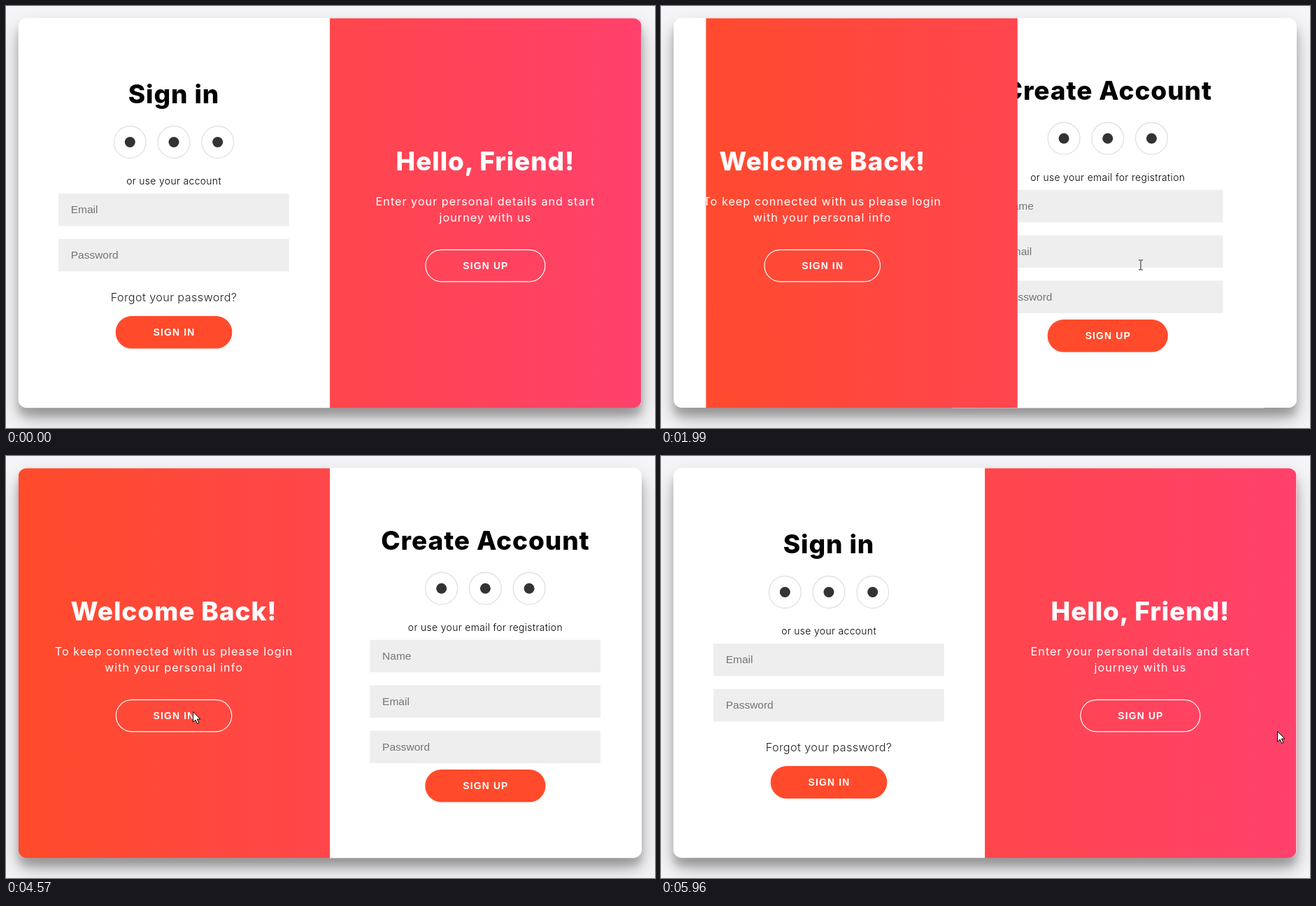
Animation of 928 by 603 pixels, one loop 6040 ms. Source, as an HTML page:

```html
<!DOCTYPE html>
<html lang="en">
<head>
<meta charset="utf-8">
<title>Sliding sign in form</title>
<style>
  html, body { margin: 0; width: 100%; height: 100%; overflow: hidden; background: #f6f5f7; }
  #shadow {
    position: absolute; left: 17.7px; top: 17.4px; width: 890.9px; height: 556.8px;
    border-radius: 11.6px; background: #fff;
    box-shadow: 0 16px 32px rgba(0, 0, 0, .25), 0 12px 12px rgba(0, 0, 0, .22);
  }
  svg { position: absolute; left: 0; top: 0; }
  text { font: 16.2px Inter, sans-serif; text-anchor: middle; }
  .title { font-size: 37px; font-weight: 800; letter-spacing: .9px; }
  .lead { letter-spacing: 1px; }
  .small { font-size: 13.9px; font-weight: 300; letter-spacing: .35px; }
  .link { font-weight: 300; letter-spacing: .4px; fill: #222; }
  .hint { font: 15.5px "Liberation Sans", Arial, sans-serif; text-anchor: start; fill: #757575; }
  .label { font: bold 13.9px "Liberation Sans", Arial, sans-serif; letter-spacing: 1.16px; fill: #fff; }
  .light { fill: #fff; }
</style>
</head>
<body>
<div id="shadow"></div>
<svg width="928" height="603" viewBox="0 0 928 603">
  <defs>
    <clipPath id="cardClip"><rect x="17.7" y="17.4" width="890.9" height="556.8" rx="11.6"/></clipPath>
    <clipPath id="paneClip"><rect id="pane" y="17" width="445.4" height="558"/></clipPath>
    <linearGradient id="red" gradientUnits="userSpaceOnUse" x1="18" x2="909">
      <stop stop-color="#ff4b2b"/><stop offset="1" stop-color="#ff416c"/>
    </linearGradient>
  </defs>
  <g clip-path="url(#cardClip)">
    <g id="signIn"></g>
    <g id="signUp"></g>
    <g clip-path="url(#paneClip)">
      <rect x="17" y="17" width="893" height="558" fill="url(#red)"/>
      <g id="welcome"></g>
      <g id="hello"></g>
    </g>
  </g>
  <g id="cursor">
    <circle id="ring" r="13" fill="none" stroke="#333" stroke-width="1.2"/>
    <path id="arrow" d="M.5 .5V15.2L4 12l2.6 5.6 2.3-1.1L6.4 11H11Z" fill="#fff" stroke="#000"/>
    <path id="beam" d="M-1-6H1.5L2-5.5 2.5-6H5M2-5.5V7.5M-1 8H1.5L2 7.5 2.5 8H5" fill="none" stroke="#222"/>
  </g>
</svg>
<script>
const $ = id => document.getElementById(id);
const LOOP = 6040, HALF = 445.4, LEFT = 17.7, MID = 240, STEP = 77;

// Markup helpers; forms are laid out in the left half of the card.
const text = (cls, y, words, x = MID) => `<text class="${cls}" x="${x}" y="${y}">${words}</text>`;

const button = (y, width, words, x = MID, fill = 'none', stroke = '#fff') =>
  `<rect x="${x - width / 2}" y="${y}" width="${width}" height="45.4" rx="22.7"
    fill="${fill}" stroke="${stroke}" stroke-width="1.16"/>` + text('label', y + 27.8, words, x + .5);

const field = (y, words) =>
  `<rect x="75" y="${y}" width="329.7" height="46.4" fill="#eee"/>` + text('hint', y + 28, words, 92.7);

const socials = y => [-62.7, 0, 62.7].map(dx =>
  `<circle cx="${MID + dx}" cy="${y}" r="22.9" fill="none" stroke="#ddd" stroke-width="1.16"/>
   <circle cx="${MID + dx}" cy="${y}" r="7.5" fill="#333"/>`).join('');

const panel = (x, title, lines, width, label) =>
  text('title light', 235, title, x) + text('lead light', 285, lines[0], x) +
  text('lead light', 308, lines[1], x) + button(348.4, width, label, x);

const form = (top, title, note, fields, rest) =>
  '<rect x="17" y="17" width="446.4" height="558" fill="#fff"/>' +
  text('title', top, title) + socials(top + 55.5) + text('small', top + 116, note) +
  fields.map((name, i) => field(top + 129 + i * 64.9, name)).join('') + rest;

$('signIn').innerHTML = form(139, 'Sign in', 'or use your account', ['Email', 'Password'],
  text('link', 422, 'Forgot your password?') + button(443.5, 165.5, 'SIGN IN', MID, '#ff4b2b', '#ff4b2b'));
$('signUp').innerHTML = form(133.7, 'Create Account', 'or use your email for registration',
  ['Name', 'Email', 'Password'], button(448.6, 171, 'SIGN UP', MID, '#ff4b2b', '#ff4b2b'));
$('welcome').innerHTML = panel(MID, 'Welcome Back!',
  ['To keep connected with us please login', 'with your personal info'], 165.5, 'SIGN IN');
$('hello').innerHTML = panel(MID + HALF, 'Hello, Friend!',
  ['Enter your personal details and start', 'journey with us'], 171, 'SIGN UP');

const clamp = v => Math.min(1, Math.max(0, v));
const smooth = v => v * v * (3 - 2 * v);

// Same curve as the CSS "ease" keyword.
function ease(x) {
  let lo = 0, hi = 1;
  for (let i = 0; i < 24; i++) {
    const u = (lo + hi) / 2;
    if (.75 * u * (1 - u) + u ** 3 < x) lo = u; else hi = u;
  }
  return .3 * lo * (1 - lo) ** 2 + 3 * lo * lo * (1 - lo) + lo ** 3;
}

// The slide advances in short held steps, counted from the anchor time.
function slide(t, start, duration, anchor, end) {
  if (t >= end) return 1;
  const held = anchor + Math.floor((t - anchor) / STEP) * STEP;
  return ease(clamp((held - start) / duration));
}

const moves = [
  { from: 580, to: 1040, a: [906, 390], b: [684, 369] },
  { from: 2720, to: 3400, a: [684, 369], b: [267, 365] },
  { from: 5530, to: 5960, a: [267, 365], b: [881, 393] },
];

function pointer(t) {
  const move = moves.filter(m => t >= m.from).pop() || moves[0];
  const k = smooth(clamp((t - move.from) / (move.to - move.from)));
  return move.a.map((v, i) => v + (move.b[i] - v) * k);
}

const shift = (id, x, y = 0) => $(id).setAttribute('transform', `translate(${x} ${y})`);
const show = (id, on) => $(id).setAttribute('visibility', on ? 'visible' : 'hidden');

function draw(t) {
  const p = slide(t, 1618, 590, 1750, 2220) - slide(t, 4692, 616, 4820, 5200);
  const offset = HALF * p, paneX = LEFT + HALF - offset;

  shift('signIn', offset);
  shift('signUp', offset);
  show('signUp', t >= 1981 && t < 4692);
  $('pane').setAttribute('x', paneX);
  shift('welcome', -.2 * HALF * (1 - p));
  shift('hello', .2 * HALF * p);

  const [x, y] = pointer(t);
  const visible = t >= 580;
  const covered = x >= paneX && x <= paneX + HALF;
  const typing = !covered && x > 75 + offset && x < 405 + offset;
  shift('cursor', Math.round(x), Math.round(y));
  show('arrow', visible && !typing);
  show('beam', visible && typing);
  show('ring', (t >= 1440 && t < 1510) || (t >= 4400 && t < 4560));
}

const begin = performance.now();
function frame() {
  draw((performance.now() - begin) % LOOP);
  requestAnimationFrame(frame);
}
frame();
</script>
</body>
</html>
```
